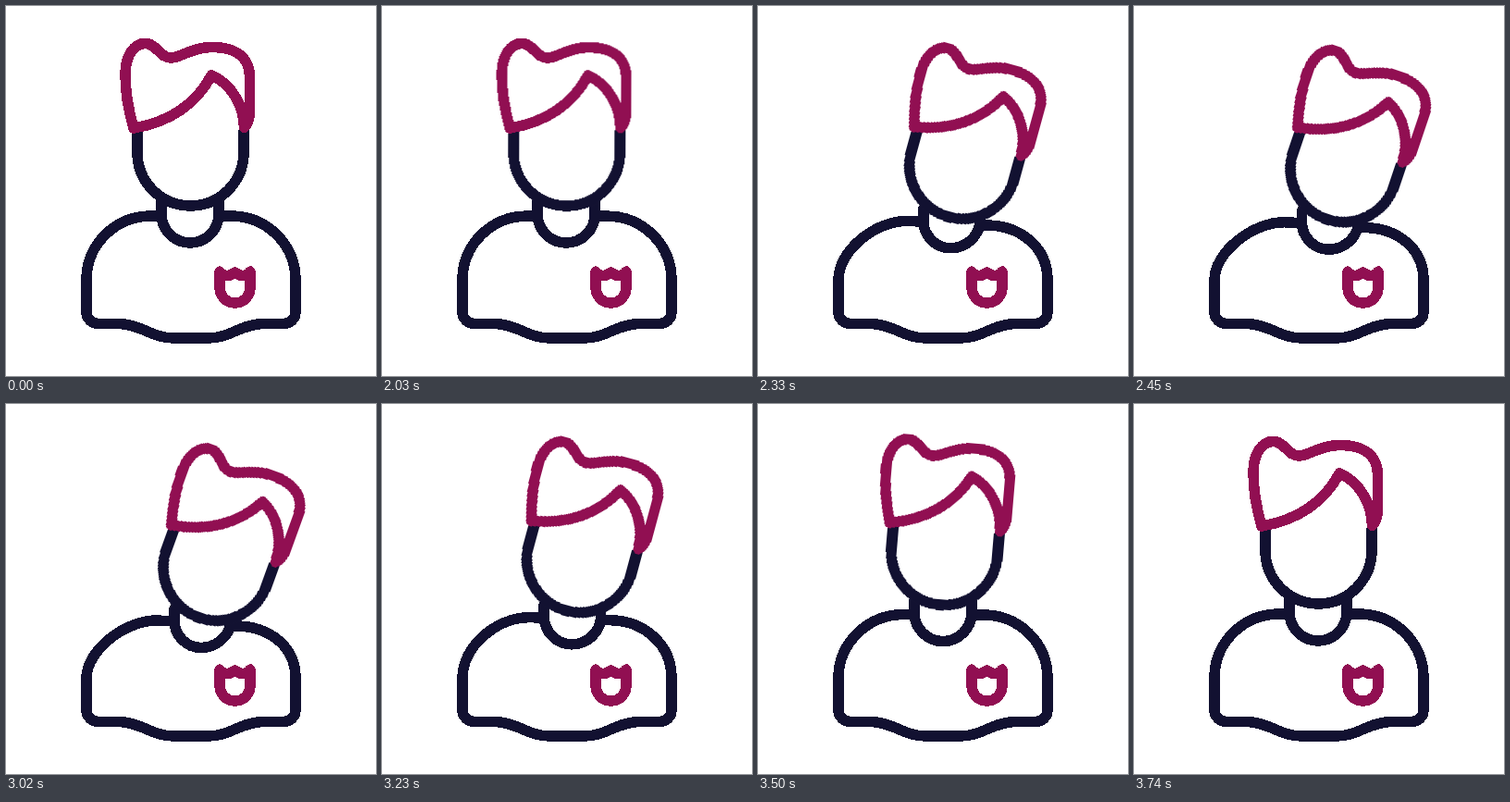
Write an HTML page that moves like this. It is 400 px wide and 400 px high and loops after 3.77 s.

```html
<!DOCTYPE html>
<html lang="en">
<head>
<meta charset="utf-8">
<title>Tilting head</title>
<style>
  html, body { margin: 0; width: 100%; height: 100%; overflow: hidden; background: #fff; }
  svg { display: block; width: 100vw; height: 100vh; shape-rendering: crispEdges; }
  path {
    fill: none; stroke: #121131; stroke-width: 11.5;
    stroke-linecap: round; stroke-linejoin: round;
  }
  .accent { stroke: #910f52; }

  .torso {
    --rest: path("M168 227 L157 227 C118 227 87 258 87 296 L87 331 C87 338 93 343.5 100 343.5 L122 343.5 C146 344 158 359 181 359 L219 359 C242 359 254 344 278 343.5 L300 343.5 C307 343.5 313 338 313 331 L313 296 C313 258 282 227 243 227 L230 227");
    --lean: path("M181 235 L163 234 C128 234 87 267 87 296 L87 331 C87 338 93 343.5 100 343.5 L122 343.5 C146 344 158 359 181 359 L219 359 C242 359 254 344 278 343.5 L300 343.5 C307 343.5 313 338 313 331 L313 296 C313 262 285 241 250 240 L242 240");
  }
  .neck {
    --rest: path("M168 211 L168 225 C168 242 182 256 199 256 C216 256 230 242 230 225 L230 211");
    --lean: path("M182 222 L182 234 C182 250 195 263.5 211 263.5 C227 263.5 240 252 243 238 L243 236");
  }
  .torso, .neck { d: var(--rest); animation: body 3770ms infinite; }
  .shift { animation: shift 3770ms infinite; }
  .tilt { animation: tilt 3770ms infinite; transform-origin: 199.5px 158.5px; }

  /* Lean starts at 2000 ms, return starts at 2990 ms and ends at 3750 ms. */
  @keyframes body {
    0%, 99.47%, 100% { d: var(--rest); }
    53.05% { d: var(--rest); animation-timing-function: cubic-bezier(.33, 0, .5, 1); }
    67.37% { d: var(--lean); }
    79.31% { d: var(--lean); animation-timing-function: cubic-bezier(.33, 0, .2, 1); }
  }
  @keyframes shift {
    0%, 99.47%, 100% { transform: translate(0, 0); }
    53.05% { transform: translate(0, 0); animation-timing-function: cubic-bezier(.33, 0, .5, 1); }
    67.37% { transform: translate(28.3px, 18.3px); }
    79.31% { transform: translate(28.3px, 18.3px); animation-timing-function: cubic-bezier(.33, 0, .2, 1); }
  }
  @keyframes tilt {
    0%, 99.47%, 100% { transform: rotate(0deg); }
    53.05% { transform: rotate(0deg); animation-timing-function: cubic-bezier(.33, 0, .3, 1); }
    69.76% { transform: rotate(20deg); }
    79.31% { transform: rotate(20deg); animation-timing-function: cubic-bezier(.33, 0, .65, 1); }
  }
</style>
</head>
<body>
<svg viewBox="0 0 400 400">
  <path class="torso"/>
  <path class="neck"/>
  <path class="accent" d="M231 287 C236 294 242 292 247.5 288 C253 292 259 294 264 287 V304 C264 313.5 257 321 247.5 321 S231 313.5 231 304 Z"/>
  <g class="shift">
    <g class="tilt">
      <path d="M142 135 V158.5 A57.5 57.5 0 0 0 257 158.5 V135"/>
      <path class="accent" d="M138 132 C131 108 129 88 129 74 C129 54 138 40.5 150.5 40.5 C163 40.5 166 56 178 56 C190 56 200 44.5 223 44.5 C246 44.5 263.5 54 263.5 77 V112 C263.5 122 262 128 257.5 131.5 C257 108 244 84 222 75 C206 106 176 126 138 132 Z"/>
    </g>
  </g>
</svg>
</body>
</html>
```
